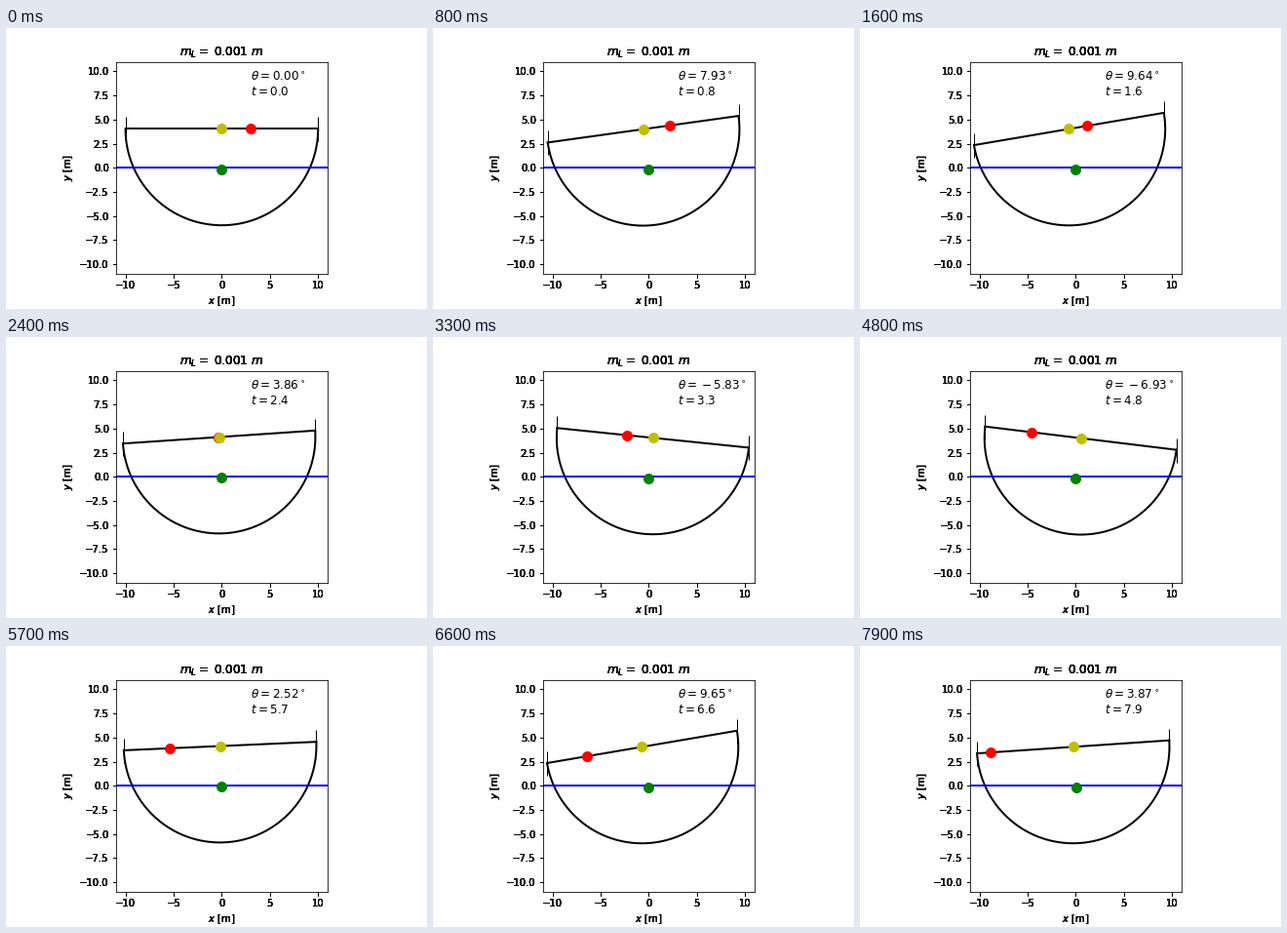
Animation of 432x288 px, one loop 8000 ms. Source, as a matplotlib script:

```python
import numpy as np
import matplotlib.pyplot as plt
from matplotlib.animation import FuncAnimation

# Half-disc ship floating in water, with a small load sliding along its deck
R = 10.0                                    # radius
G = 9.81
H = 4 * R / (3 * np.pi)                     # deck centre to centre of mass
INERTIA = R**2 / 2 * (1 - 32 / (9 * np.pi**2))   # per unit mass
LOAD = 0.001                                # load mass / ship mass
FRAMES, DT, SUBSTEPS = 80, 0.1, 10


def segment(b):
    return b - np.sin(b) * np.cos(b)


def floating_angle():
    """Half-angle of the wet arc for a ship half as dense as water."""
    b = 1.0
    for _ in range(30):
        b -= (segment(b) - np.pi / 4) / (2 * np.sin(b)**2)
    return b


def rates(q):
    _, y, th, s = q[:4]
    sin, cos = np.sin(th), np.cos(th)
    wet = np.arccos((y + H * cos) / R)
    lift = 4 * G * segment(wet) / np.pi
    push = LOAD * G * cos
    acc = [push * sin,
           lift - G - push * cos,
           -(lift * H * sin + push * s) / INERTIA,
           -G * sin]
    return np.concatenate([q[4:], acc])


def rk4(q, dt):
    k1 = rates(q)
    k2 = rates(q + dt / 2 * k1)
    k3 = rates(q + dt / 2 * k2)
    k4 = rates(q + dt * k3)
    return q + dt / 6 * (k1 + 2 * k2 + 2 * k3 + k4)


def simulate():
    y0 = R * np.cos(floating_angle()) - H
    q = np.array([0, y0, 0, 3.0, 0, 0, 0.2, 0])   # x, y, theta, s, velocities
    out = [q]
    for _ in range(FRAMES - 1):
        for _ in range(SUBSTEPS):
            q = rk4(q, DT / SUBSTEPS)
        out.append(q)
    return out


def darken(artist, n=8):
    """Draw an artist several times so its soft edges turn dark."""
    draw = artist.draw

    def repeat(renderer):
        for _ in range(n):
            draw(renderer)

    artist.draw = repeat


states = simulate()

plt.rcParams.update({"font.family": "DejaVu Sans", "font.size": 10,
                     "figure.subplot.bottom": 0.125})
fig, ax = plt.subplots(figsize=(6, 4), dpi=72, facecolor="white")
ax.set_aspect("equal")
ax.set(xlim=(-11, 11), ylim=(-11, 11),
       xticks=np.arange(-10, 11, 5), yticks=np.arange(-10, 10.1, 2.5),
       xlabel="$x$ [m]", ylabel="$y$ [m]")
ax.set_title("$m_L = $ 0.001 $m$")

for text in (ax.title, ax.xaxis.label, ax.yaxis.label):
    darken(text)
for tick in ax.xaxis.get_major_ticks() + ax.yaxis.get_major_ticks():
    darken(tick.label1)
    darken(tick.tick1line)

arc, = ax.plot([], [], "k", lw=2)
deck, = ax.plot([], [], "k|-", lw=2, ms=25)
ax.plot([-11, 11], [0, 0], "b", lw=2)
mass, = ax.plot([], [], "go", ms=10)
load, = ax.plot([], [], "ro", ms=10)
middle, = ax.plot([], [], "yo", ms=10)
angle_text = ax.text(3, 9, "", fontsize=12)
time_text = ax.text(3, 7.5, "", fontsize=12)

phi = np.linspace(np.pi, 2 * np.pi, 200)


def update(i):
    x, y, th, s = states[i][:4]
    cx, cy = x - H * np.sin(th), y + H * np.cos(th)
    along = np.array([-R, R])
    arc.set_data(cx + R * np.cos(phi + th), cy + R * np.sin(phi + th))
    deck.set_data(cx + along * np.cos(th), cy + along * np.sin(th))
    mass.set_data([x], [y])
    load.set_data([cx + s * np.cos(th)], [cy + s * np.sin(th)])
    middle.set_data([cx], [cy])
    # The empty group keeps the wide spacing around a minus sign
    angle_text.set_text(rf"$\theta = {{}}{np.degrees(th):.2f}^\circ$")
    time_text.set_text(f"$t = {i * DT:.1f}$")
    return arc, deck, mass, load, middle, angle_text, time_text


anim = FuncAnimation(fig, update, frames=FRAMES, interval=100,
                     repeat=True, repeat_delay=0)
plt.show()
```
